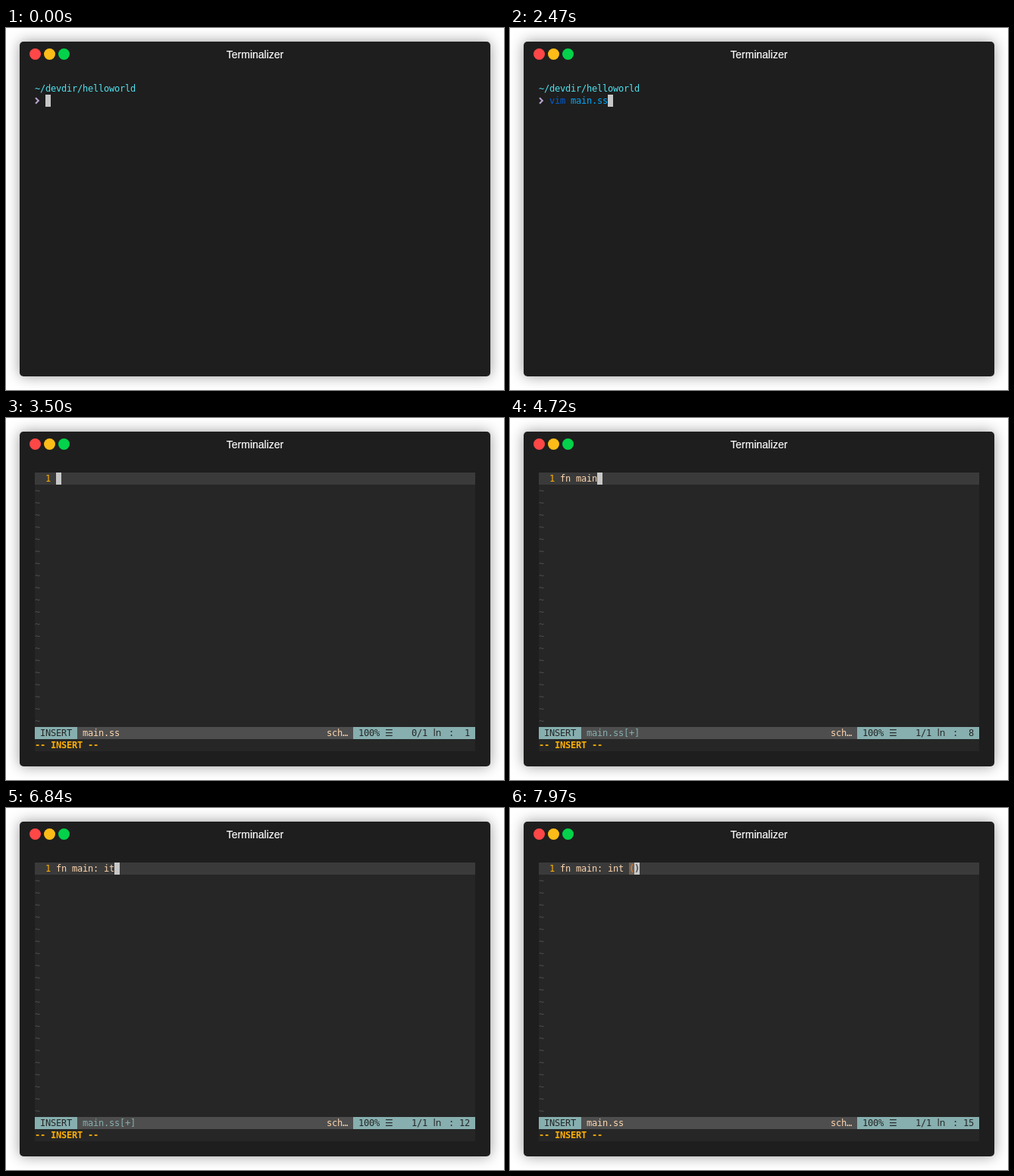
An HTML page for the animation above (8000 ms loop, 657 by 478 pixels).

```html
<!DOCTYPE html>
<html lang="en">
<head>
<meta charset="utf-8">
<title>Terminal session</title>
<style>
  html, body { margin: 0; width: 100%; height: 100%; overflow: hidden; background: #fff; }
  #win {
    position: absolute; left: 18px; top: 18px; width: 621px; height: 442px;
    border-radius: 5px; background: #1e1e1e; box-shadow: 0 0 18px rgba(0, 0, 0, .4);
  }
  svg { position: absolute; left: 0; top: 0; display: block; }
  #title { font: 14px "Liberation Sans", Arial, sans-serif; fill: #fff; stroke: #fff; stroke-width: .2px; }
  #screen { font: 12px "DejaVu Sans Mono", monospace; }
  .sans { font-family: "DejaVu Sans", sans-serif; }
  .bold { font-weight: bold; }
</style>
</head>
<body>
<div id="win"></div>
<svg width="657" height="478" viewBox="0 0 657 478">
  <circle cx="38.5" cy="34.5" r="7.5" fill="#ff4747"/>
  <circle cx="57.5" cy="34.5" r="7.5" fill="#fdbc17"/>
  <circle cx="76.5" cy="34.5" r="7.5" fill="#03d24a"/>
  <text id="title" x="328.5" y="40" text-anchor="middle">Terminalizer</text>
  <g id="screen"></g>
</svg>
<script>
const LOOP = 8000, LEFT = 38, TOP = 72, CW = 7, CH = 16, COLS = 83, ROWS = 23;
const CURSOR = '#c7c7c7', DARK = '#262626', LINE = '#3a3a3a', GREY = '#4e4e4e';
const CREAM = '#ffd7af', GOLD = '#ffaf00', TEAL = '#87afaf', SILVER = '#949494';

const x = col => LEFT + CW * col;
const y = row => TOP + CH * row;

const box = (row, col, w, fill, h = 1) =>
  `<rect x="${x(col)}" y="${y(row)}" width="${w * CW}" height="${h * CH}" fill="${fill}"/>`;

// One glyph per terminal cell.
function put(row, col, str, fill, cls = '') {
  const cells = [...str].map((ch, i) => [ch, x(col + i)]).filter(c => c[0] !== ' ');
  if (!cells.length) return '';
  return `<text class="${cls}" x="${cells.map(c => c[1]).join(' ')}" y="${y(row) + 12}" ` +
    `fill="${fill}">${cells.map(c => c[0]).join('')}</text>`;
}

const label = (row, px, str, fill) =>
  `<text class="sans" x="${px}" y="${y(row) + 12}" fill="${fill}">${str}</text>`;

function shell(typed, entered = false) {
  return put(0, 0, '~/devdir/helloworld', '#4fe3f0') +
    '<path d="M39 92.3L42.8 96L39 99.7" fill="none" stroke="#b9a6d0" stroke-width="2"/>' +
    put(1, 2, typed.slice(0, 3), '#005fd7') +
    put(1, 6, typed.slice(4), '#00a8fb') +
    (entered ? box(2, 0, 1, CURSOR) : box(1, 2 + typed.length, 1, CURSOR));
}

const blank = () => box(0, 0, 1, CURSOR);

function vim(code, opt = {}) {
  const { mode = 'INSERT', saved = !code, msg = true, cursor = true, pair = false } = opt;
  const insert = mode === 'INSERT';
  const side = insert ? TEAL : SILVER, mid = insert ? GREY : LINE;
  const info = insert ? CREAM : SILVER;
  const end = 4 + code.length, bar = ROWS - 2;

  let out = box(0, 0, COLS, DARK, ROWS) + box(0, 0, COLS, LINE) +
    put(0, 2, '1', GOLD) + put(0, 4, code, CREAM);
  if (pair) out += box(0, end, 1, '#6a625a') + put(0, end, '(', '#d7762a', 'bold');
  const at = end + (pair ? 1 : 0);
  if (cursor) out += box(0, at, 1, CURSOR);
  if (pair) out += put(0, at, ')', cursor ? '#1e1e1e' : CREAM);

  for (let r = 1; r < bar; r++) out += put(r, 0, '~', GREY);

  out += box(bar, 0, COLS, mid) + box(bar, 0, 8, side) + box(bar, 60, 23, side) +
    put(bar, 1, mode, DARK) +
    put(bar, 9, saved ? 'main.ss' : 'main.ss[+]', saved ? info : TEAL) +
    put(bar, 55, 'sch…', info) +
    put(bar, 61, '100%', DARK) + label(bar, 500, '☰', DARK) +
    put(bar, 71, (code ? 1 : 0) + '/1', DARK) + label(bar, 563.5, 'ln', DARK) +
    put(bar, 78, ':', DARK) +
    put(bar, 79, String(at - 3).padStart(3), DARK);
  if (insert && msg) out += put(bar + 1, 0, '-- INSERT --', GOLD, 'bold');
  return out;
}

const command = 'vim main.ss';
const commandTimes = [1170, 1400, 1468, 1604, 1672, 1740, 1960, 2043, 2127, 2210, 2470];
const edits = [
  [3900, 'f'], [4020, 'fn'], [4210, 'fn '],
  [4400, 'fn m'], [4507, 'fn ma'], [4613, 'fn mai'], [4720, 'fn main'],
  [5530, 'fn mainL'], [5710, 'fn main'], [6170, 'fn mainL'], [6310, 'fn main'],
  [6420, 'fn main:'], [6640, 'fn main: '], [6740, 'fn main: i'], [6840, 'fn main: it'],
  [7210, 'fn main: i'], [7470, 'fn main: in'], [7600, 'fn main: int'], [7740, 'fn main: int ']
];
const done = 'fn main: int ';

const steps = [
  [0, shell('')],
  ...commandTimes.map((t, i) => [t, shell(command.slice(0, i + 1))]),
  [2790, shell(command, true)],
  [3060, blank()],
  [3220, vim('', { mode: 'NORMAL' })],
  [3480, vim('', { msg: false })],
  [3500, vim('')],
  ...edits.map(([t, code]) => [t, vim(code)]),
  [7920, vim(done, { msg: false, cursor: false })],
  [7950, vim(done, { msg: false, saved: true, pair: true })],
  [7970, vim(done, { saved: true, pair: true })]
];

const screen = document.getElementById('screen');
const start = performance.now();
let shown = -1;

function draw() {
  const t = (performance.now() - start) % LOOP;
  let i = steps.length - 1;
  while (steps[i][0] > t) i--;
  if (i !== shown) {
    screen.innerHTML = steps[i][1];
    shown = i;
  }
  requestAnimationFrame(draw);
}
draw();
</script>
</body>
</html>
```
